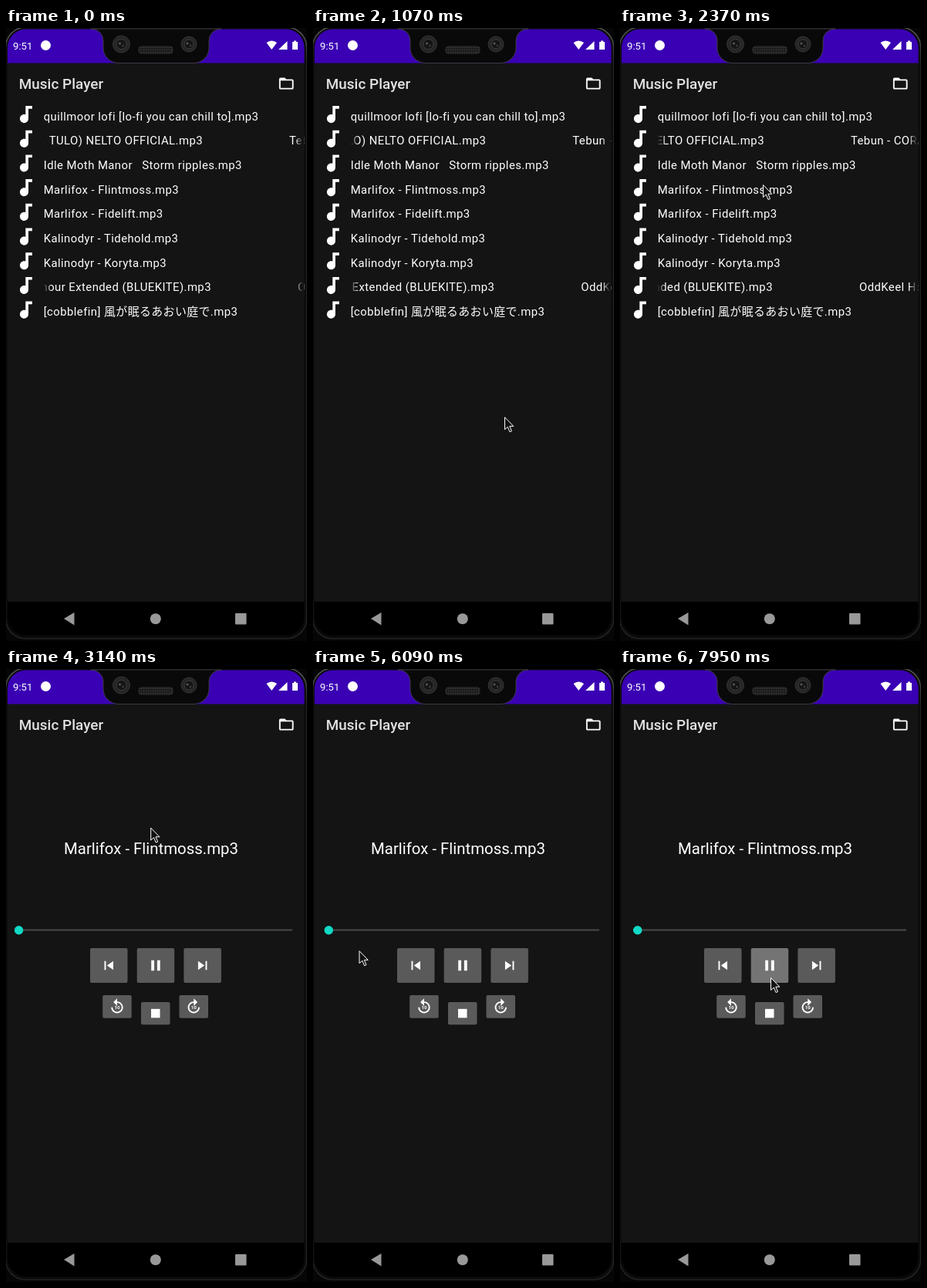
An HTML page that plays this animation: 390 by 795 pixels, repeating every 8 s.

```html
<!DOCTYPE html>
<html lang="en">
<head>
<meta charset="utf-8">
<title>Music Player</title>
<style>
html, body { margin: 0; width: 100%; height: 100%; overflow: hidden; background: #060606; }
svg { display: block; }
text { font-family: Roboto, "Noto Sans CJK JP", "Noto Sans CJK", sans-serif; fill: #fff; white-space: pre; }
.row { font-size: 14.9px; letter-spacing: .43px; }
.ten { font-size: 6.5px; font-weight: 700; text-anchor: middle; }
</style>
</head>
<body>
<svg width="390" height="795" viewBox="0 0 390 795" fill="#fff">
  <defs>
    <linearGradient id="fadeL"><stop stop-color="#141414"/><stop offset="1" stop-color="#141414" stop-opacity="0"/></linearGradient>
    <linearGradient id="fadeR"><stop stop-color="#141414" stop-opacity="0"/><stop offset="1" stop-color="#141414"/></linearGradient>
    <linearGradient id="rim" x2="0" y2="1"><stop stop-color="#5c5c5c"/><stop offset=".06" stop-color="#222"/></linearGradient>
    <clipPath id="screen"><rect x="2" y="1.5" width="384.5" height="786.5" rx="24"/></clipPath>
    <pattern id="mesh" width="3" height="3" patternUnits="userSpaceOnUse">
      <rect width="3" height="3" fill="#1c1c1c"/><circle cx="1.5" cy="1.5" r=".8" fill="#3b3b3b"/>
    </pattern>
    <path id="note" d="M12 3v9.28c-.47-.17-.97-.28-1.5-.28C8.01 12 6 14.01 6 16.5S8.01 21 10.5 21c2.31 0 4.2-1.75 4.45-4H15V6h4V3z"/>
    <path id="prev" d="M6 6h2v12H6zm3.5 6l8.5 6V6z"/>
    <path id="next" d="M6 18l8.5-6L6 6zM16 6v12h2V6z"/>
    <path id="pause" d="M6 19h4V5H6zm8-14v14h4V5z"/>
    <path id="stop" d="M6 6h12v12H6z"/>
    <path id="turn" d="M12 5V1L7 6l5 5V7c3.31 0 6 2.69 6 6s-2.69 6-6 6-6-2.69-6-6H4c0 4.42 3.58 8 8 8s8-3.58 8-8-3.58-8-8-8z"/>
    <g id="back"><use href="#turn"/><text class="ten" x="12" y="15.6">10</text></g>
    <g id="fwd"><use href="#turn" transform="matrix(-1 0 0 1 24 0)"/><text class="ten" x="12" y="15.6">10</text></g>
  </defs>

  <rect x="-.5" y="-1" width="390" height="793" rx="26" fill="#0a0a0a" stroke="url(#rim)" stroke-width="1.5"/>
  <g clip-path="url(#screen)">
    <rect width="390" height="795" fill="#141414"/>
    <g id="list"></g>
    <g id="player">
      <text x="75" y="240.3" font-size="20.4">Marlifox - Flintmoss.mp3</text>
      <path d="M17 338.5H371" stroke="#484848" stroke-width="2"/>
      <path id="done" stroke="#10d9c5" stroke-width="2"/>
      <circle id="thumb" cy="338.8" r="5.7" fill="#10d9c5"/>
      <g id="buttons"></g>
    </g>
    <rect width="390" height="45.5" fill="#3a00b4"/>
    <rect y="744" width="390" height="50" fill="#000"/>
    <text x="16.7" y="79" font-size="18.95" font-weight="500" fill-opacity=".88">Music Player</text>
    <path transform="translate(352 60.8) scale(.935)" d="M20 6h-8l-2-2H4c-1.1 0-2 .9-2 2v12c0 1.1.9 2 2 2h16c1.1 0 2-.9 2-2V8c0-1.1-.9-2-2-2zm0 12H4V8h16z"/>
    <text x="9" y="27.8" font-size="13.2">9:51</text>
    <circle cx="51.5" cy="22.5" r="6.5"/>
    <path d="M337.5 19Q344.2 13.8 351 19L344.2 28zM364.5 17V28H353zM371 18h2v-1.5h3V18h2v10h-7z"/>
    <g fill="#999">
      <path d="M75 766L88.500 758V774.500z"/>
      <circle cx="193.800" cy="766.300" r="7"/>
      <rect x="297" y="759" width="14.500" height="14.500" rx="1"/>
    </g>
  </g>

  <path d="M110 1A16 15 0 0 1 126 16V26A20 19.500 0 0 0 146 45.500H243A20 19.500 0 0 0 263 26V16A16 15 0 0 1 279 1z" fill="#090909" stroke="#3e3a44"/>
  <g id="cameras"></g>
  <rect x="172" y="24" width="44" height="9" rx="3" fill="url(#mesh)" stroke="#303030"/>
  <path id="cursor" d="M0 0V16L3.800 12.600 6.500 19 9 18 6.300 11.700H11.300z" fill="#111" stroke="#fff"/>
</svg>
<script>
const $ = id => document.getElementById(id);
const PITCH = 31.7, SPEED = 0.0287, OPEN = 2530;

// A row is a plain title, or [visible tail, tail end, next copy's text, its start] when it scrolls.
const rows = [
  'quillmoor lofi [lo-fi you can chill to].mp3',
  ['(feat. TULO) NELTO OFFICIAL.mp3', 255, 'Tebun - CORAL TIDE', 367],
  'Idle Moth Manor   Storm ripples.mp3',
  'Marlifox - Flintmoss.mp3',
  'Marlifox - Fidelift.mp3',
  'Kalinodyr - Tidehold.mp3',
  'Kalinodyr - Koryta.mp3',
  ['hour Extended (BLUEKITE).mp3', 266, 'OddKeel Hollow', 378],
  '[cobblefin] 風が眠るあおい庭で.mp3'
];

$('list').innerHTML = rows.map((row, i) => {
  const label = Array.isArray(row)
    ? `<g class="scroll"><text class="row" x="${row[1]}" y="119.5" text-anchor="end">${row[0]}</text>
       <text class="row" x="${row[3]}" y="119.5">${row[2]}</text></g>
       <rect y="103" width="49" height="24" fill="#141414"/>
       <rect x="48.5" y="103" width="11" height="24" fill="url(#fadeL)"/>
       <rect x="374" y="103" width="11" height="24" fill="url(#fadeR)"/>
       <rect x="384.5" y="103" width="5" height="24" fill="#141414"/>`
    : `<text class="row" x="48.7" y="119.5">${row}</text>`;
  return `<g transform="translate(0 ${i * PITCH})">${label}
    <use href="#note" transform="translate(10.6 97.3) scale(1.23)"/></g>`;
}).join('');

const button = (icon, x, y, w, h) => `<rect id="${icon}Box" x="${x}" y="${y}" width="${w}" height="${h}" rx="2" fill="#5a5a5a"/>
  <use href="#${icon}" transform="translate(${x + w / 2 - 11.5} ${y + h / 2 - 11.5}) scale(.96)"/>`;
$('buttons').innerHTML =
  button('prev', 109, 362, 48.5, 45) + button('pause', 169.7, 362, 48.5, 45) + button('next', 230.4, 362, 48.5, 45) +
  button('back', 125.2, 423, 37.5, 29.7) + button('stop', 175, 432, 37.5, 29.2) + button('fwd', 224.5, 423, 37.5, 29.7);

$('cameras').innerHTML = [[149.5, 11], [237, 10]].map(([x, r]) =>
  `<circle cx="${x}" cy="21" r="${r}" fill="#252525" stroke="#353535"/>
   <circle cx="${x}" cy="21" r="${r * .6}" fill="#151515" stroke="#3d3d3d"/>
   <circle cx="${x - 2}" cy="20" r="1.6" fill="#555"/><circle cx="${x + 2}" cy="23" r="1.2" fill="#444"/>`).join('');

// Pointer path: time, x, y
const path = [
  [400, 391, 719], [840, 259, 515], [1070, 248.5, 505], [1500, 239, 405], [1910, 210.5, 253.5],
  [2230, 185.5, 203.5], [3070, 185.5, 203.5], [3140, 187.5, 206], [3370, 232.5, 219], [3470, 232.5, 219],
  [3700, 215, 190], [4310, 136, 434], [4460, 110, 462], [4610, 83.5, 440.5], [5010, 44.5, 368],
  [5170, 44.5, 368], [5310, 51, 368.5], [6020, 51, 368.5], [6090, 59.5, 365.5], [6400, 232, 420],
  [6630, 222, 441], [6960, 222, 441], [7260, 205, 395], [7790, 215.5, 466], [7950, 195.5, 400.5]
];

function pointer(t) {
  if (t < path[0][0]) return [-50, -50];
  const i = path.findIndex(p => p[0] > t);
  if (i < 0) return path[path.length - 1].slice(1);
  const [t0, x0, y0] = path[i - 1], [t1, x1, y1] = path[i], k = (t - t0) / (t1 - t0);
  return [x0 + (x1 - x0) * k, y0 + (y1 - y0) * k];
}

const scrollers = document.querySelectorAll('.scroll');

function draw(now) {
  const t = now % 8000, open = t >= OPEN;
  $('list').style.display = open ? 'none' : '';
  $('player').style.display = open ? '' : 'none';
  scrollers.forEach(s => s.setAttribute('transform', `translate(${-t * SPEED} 0)`));
  // The seek bar advances once a second.
  const x = 16.6 + 1.25 * Math.max(0, Math.floor((t - 2540) / 1000));
  $('thumb').setAttribute('cx', x);
  $('done').setAttribute('d', `M17 338.5H${x}`);
  $('pauseBox').setAttribute('fill', t > 7260 ? '#747474' : '#5a5a5a');
  $('cursor').setAttribute('transform', `translate(${pointer(t)})`);
  requestAnimationFrame(draw);
}
requestAnimationFrame(draw);
</script>
</body>
</html>
```
